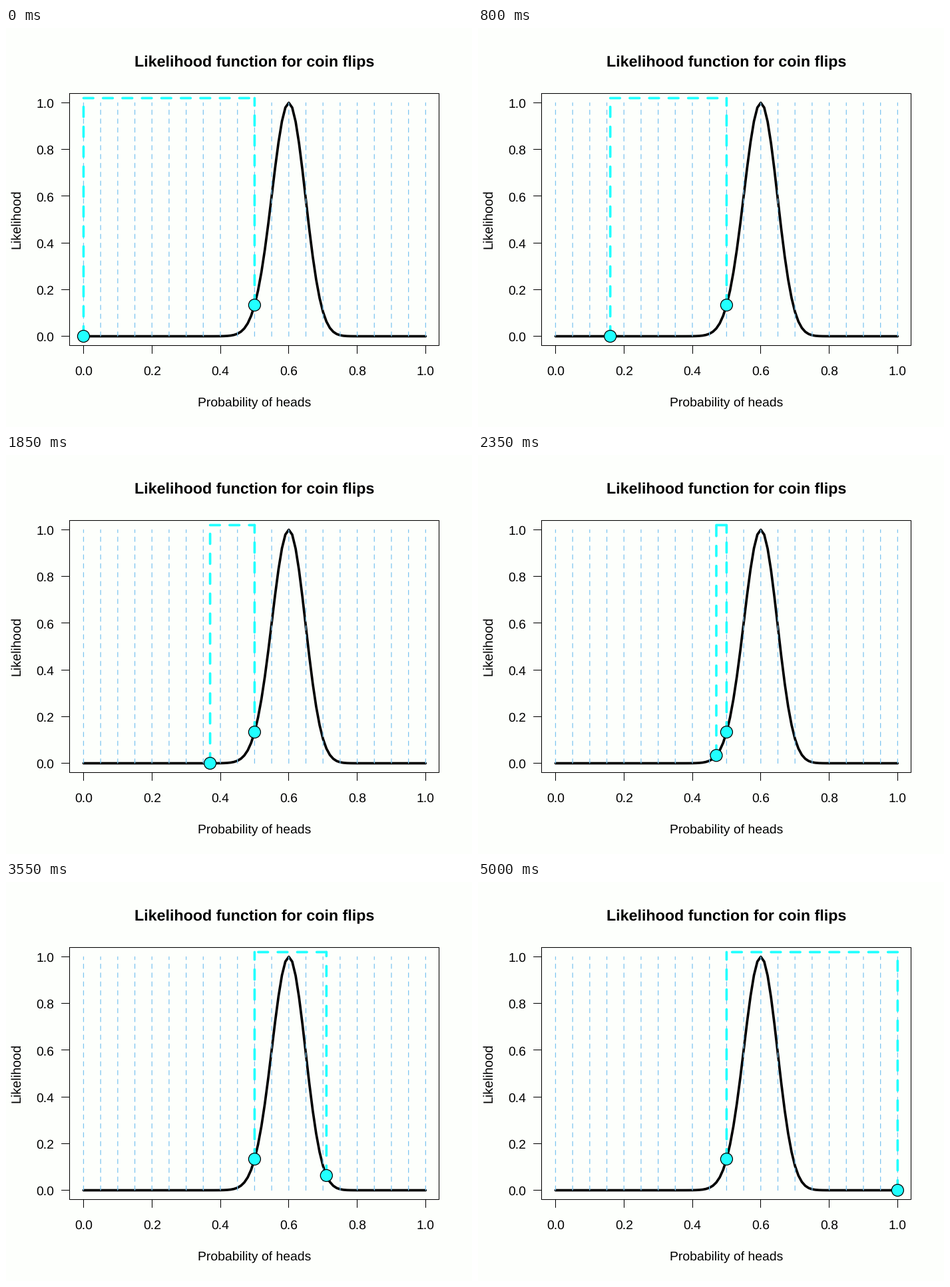
A matplotlib script that plays this animation: 700x600 px, repeating every 5050 ms.

```python
import numpy as np
import matplotlib.pyplot as plt
from matplotlib.animation import FuncAnimation
from matplotlib.patches import Circle

W, H, DPI = 700, 600, 100
PT = 72 / DPI                      # points per pixel
LEFT, RIGHT, TOP, BOTTOM = 95.9, 650.9, 98.4, 477.6
BACK, INK, CYAN, SKY = "#fdfffc", "black", "#21ffff", "#7cc4f0"
THIN, THICK = 1.25, 3.7            # line widths in pixels
FIXED, ROOF = 0.5, 1.02

plt.rcParams.update({
    "font.family": "Liberation Sans",
    "text.hinting": "none",
    "lines.scale_dashes": False,
    "lines.dash_capstyle": "round",
    "lines.solid_capstyle": "round",
    "lines.solid_joinstyle": "round",
})


def px(p):
    return LEFT + (RIGHT - LEFT) * (np.asarray(p) + 0.04) / 1.08


def py(v):
    return BOTTOM - (BOTTOM - TOP) * (np.asarray(v) + 0.04) / 1.08


def likelihood(p, heads=60, tails=40):
    """Binomial likelihood scaled to a peak of 1."""
    top = heads / (heads + tails)
    return (p / top) ** heads * ((1 - p) / (1 - top)) ** tails


fig = plt.figure(figsize=(W / DPI, H / DPI), dpi=DPI, facecolor=BACK)
ax = fig.add_axes([0, 0, 1, 1])
ax.set_xlim(0, W)
ax.set_ylim(H, 0)
ax.axis("off")


def stroke(xs, ys, color=INK, lw=THIN, z=2, **kw):
    return ax.plot(xs, ys, color=color, lw=lw * PT, zorder=z, **kw)[0]


def crisp(xs, ys):
    # snapping rounds up by half a pixel, so step back first
    stroke(np.array(xs) - 0.5, np.array(ys) - 0.5, lw=1.05, snap=True)


def dashed(color, lw, dash, z, xs=(), ys=()):
    return stroke(xs, ys, color, lw, z, snap=False,
                  linestyle=(0, (dash * PT, dash * PT)))


def dot(z, x=0, y=0):
    return ax.add_patch(Circle((x, y), 9, fc=CYAN, ec=INK, lw=THIN * PT,
                               zorder=z))


def label(x, y, s, size=19.4, ha="center", **kw):
    ax.text(x, y, s, fontsize=size * PT, ha=ha, va="baseline", color=INK, **kw)


# frame, ticks and text
crisp([LEFT, RIGHT, RIGHT, LEFT, LEFT], [TOP, TOP, BOTTOM, BOTTOM, TOP])
for t in np.linspace(0, 1, 6):
    x, y = px(t), py(t)
    crisp([x, x], [BOTTOM, BOTTOM + 12])
    crisp([LEFT - 12, LEFT], [y, y])
    label(x, 521.6, f"{t:.1f}")
    label(72.5, y + 7.5, f"{t:.1f}", ha="right")

mid = (LEFT + RIGHT) / 2
label(mid, 58.3, "Likelihood function for coin flips", 23.3, weight="bold")
label(mid, 569, "Probability of heads")
label(21.4, 288, "Likelihood", 19.8, rotation=90, rotation_mode="anchor")

# likelihood curve with guides over it
grid = np.linspace(0, 1, 101)
stroke(px(grid), py(likelihood(grid)), lw=THICK, z=3, snap=False)
for g in np.linspace(0, 1, 21):
    dashed(SKY, THIN, 6.67, 4, [px(g)] * 2, [py(0), py(1)])

# bracket between the fixed and the moving point
fixed_y = py(likelihood(FIXED))
dashed(CYAN, THICK, 15, 5, [px(FIXED)] * 2, [fixed_y, py(ROOF)])
dot(6, px(FIXED), fixed_y)
post = dashed(CYAN, THICK, 15, 5)
beam = dashed(CYAN, THICK, 14.63, 5)
mover = dot(7)


def update(i):
    p = i / 100
    x, y, roof = px(p), py(likelihood(p)), py(ROOF)
    post.set_data([x, x], [y, roof])
    beam.set_data([x, px(FIXED)], [roof, roof])
    mover.center = x, y
    return post, beam, mover


anim = FuncAnimation(fig, update, frames=101, interval=50, repeat=True,
                     repeat_delay=0, init_func=lambda: update(0))
plt.show()
```
